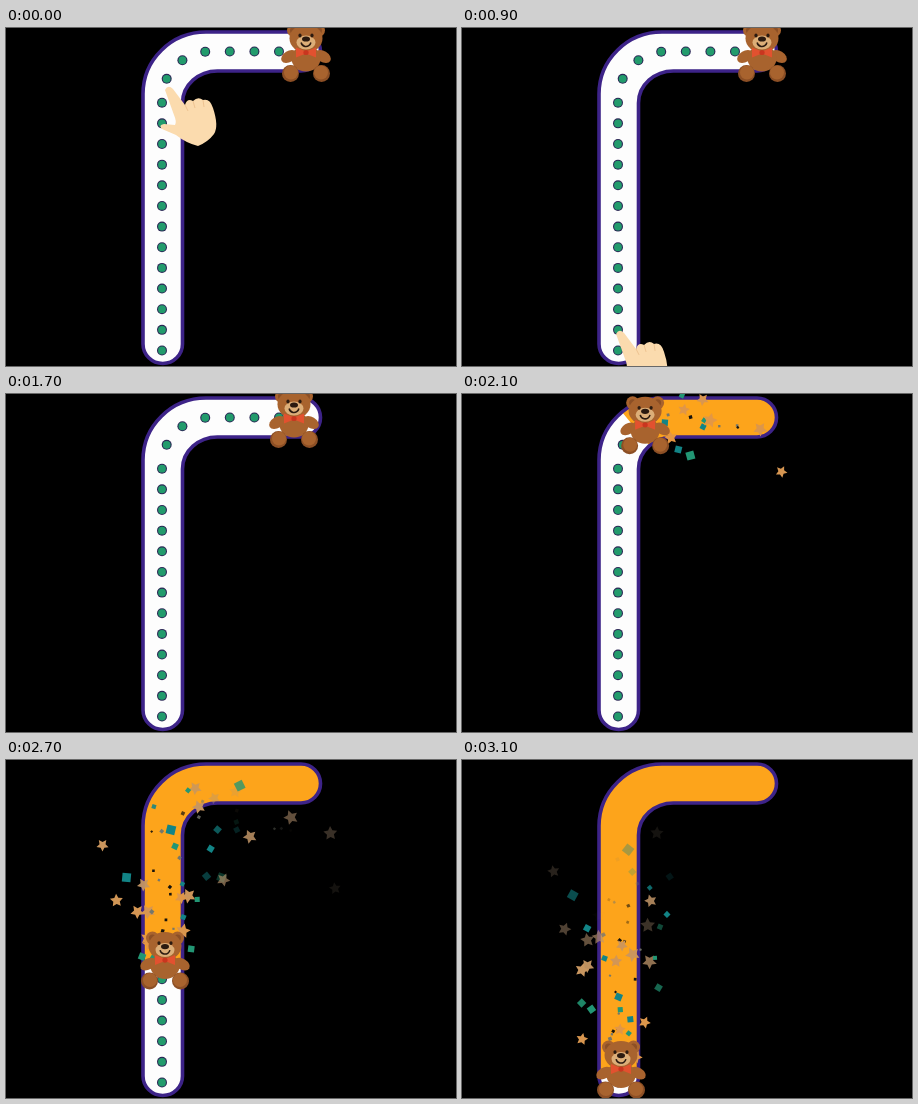
Recreate the animation shown at these times as an HTML page with a canvas. Size 450x338 px, loop 3200 ms.

```html
<!DOCTYPE html>
<html lang="en">
<head>
<meta charset="utf-8">
<title>Trace the path</title>
<style>
  html, body { margin: 0; width: 100%; height: 100%; overflow: hidden; background: #000; }
  canvas { display: block; }
</style>
</head>
<body>
<canvas id="stage" width="450" height="338"></canvas>
<script>
const ctx = document.getElementById('stage').getContext('2d');
const LOOP = 3200, STEP = 100;
const HAND_GONE = 1100, BEAR_READY = 1200, BEAR_GO = 1800;
const PIECES = 90, EMIT_TIME = 1350, LIFE = 950;

// Centre line: along the top, round the bend, then down
const TRACK = { right: 315, top: 23.5, left: 156, bend: 48 };

const track = new Path2D('M200 4H295A19.5 19.5 0 0 1 295 43H212A35 32 0 0 0 176.5 75V316A19.75 19.5 0 0 1 137 316V66A63 62 0 0 1 200 4Z');
const middle = new Path2D('M315 23.5H204A48 48 0 0 0 156 71.5V338');
const handShape = new Path2D('M-3 2Q0-4 5 1L17 17Q19 10 25 13Q30 8 35 12Q42 10 45 20Q51 38 46 46Q40 54 30 58Q18 55 8 47L-6 41Q-10 37-4 36L7 37Q9 34 6 27Z');

function pointAt(s) {
  const { right, top, left, bend } = TRACK;
  const straight = right - left - bend, arc = bend * Math.PI / 2;
  if (s < straight) return [right - s, top];
  if (s < straight + arc) {
    const a = (s - straight) / bend;
    return [left + bend * (1 - Math.sin(a)), top + bend * (1 - Math.cos(a))];
  }
  return [left, top + bend + s - straight - arc];
}

function bearDistance(t) {
  if (t < BEAR_READY) return 18;
  const keys = [[BEAR_GO, 30], [2400, 242], [2700, 314], [3100, 423]];
  const next = keys.findIndex(([time]) => time >= t);
  if (next < 1) return keys[next ? keys.length - 1 : 0][1];
  const [t0, s0] = keys[next - 1], [t1, s1] = keys[next];
  return s0 + (s1 - s0) * (t - t0) / (t1 - t0);
}

function random(seed) {
  const v = Math.sin(seed * 127.1 + 3.7) * 43758.5453;
  return v - Math.floor(v);
}

function oval(x, y, rx, ry, color, turn = 0) {
  ctx.fillStyle = color;
  ctx.beginPath();
  ctx.ellipse(x, y, rx, ry, turn, 0, Math.PI * 2);
  ctx.fill();
}

function square(size, color) {
  ctx.fillStyle = color;
  ctx.fillRect(-size / 2, -size / 2, size, size);
}

function star(r, color) {
  ctx.fillStyle = color;
  ctx.beginPath();
  for (let i = 0; i < 10; i++) {
    const a = i * Math.PI / 5 - Math.PI / 2, d = i % 2 ? r * 0.5 : r;
    ctx.lineTo(d * Math.cos(a), d * Math.sin(a));
  }
  ctx.fill();
}

function at(x, y, turn, paint) {
  ctx.save();
  ctx.translate(x, y);
  ctx.rotate(turn);
  paint();
  ctx.restore();
}

function drawTrack(fillLength) {
  ctx.fillStyle = '#fdfdfd';
  ctx.fill(track);
  for (let i = 0, s = 42; i < 19; i++) {
    const [x, y] = pointAt(s);
    oval(x, y, 5, 5, '#2b2856');
    oval(x, y, 3.9, 3.9, '#229b6c');
    s += i < 6 ? 24.6 : 20.65;
  }
  if (fillLength) {
    ctx.save();
    ctx.clip(track);
    ctx.setLineDash([fillLength, 1000]);
    ctx.lineWidth = 64;
    ctx.strokeStyle = '#fda41b';
    ctx.stroke(middle);
    ctx.restore();
  }
  ctx.lineWidth = 3.6;
  ctx.strokeStyle = '#3d2388';
  ctx.stroke(track);
}

// Pieces burst out of the moving bear, slow down, sink and fade
function drawConfetti(t) {
  for (let i = 0; i < PIECES; i++) {
    const born = BEAR_GO + i / PIECES * EMIT_TIME, age = (t - born) / LIFE;
    if (age <= 0 || age >= 1) continue;
    const [bx, by] = pointAt(bearDistance(born));
    const kind = i % 3, angle = random(i) * Math.PI * 2;
    const reach = (kind === 2 ? 28 : 72) * Math.sqrt(random(i + 100));
    const spread = reach * (1 - (1 - age) ** 4);
    const x = bx + spread * Math.cos(angle);
    const y = by + spread * Math.sin(angle) + 30 * age + 25 * age * age;
    const size = random(i + 200);

    ctx.globalAlpha = Math.min(1, (1 - age) * 2.2);
    at(x, y, random(i + 300) - 0.5 + age, () => {
      if (kind === 0) star(6 + size * 1.8, `hsl(31 ${82 - age * 65}% 58%)`);
      else if (kind === 1) square(4 + size * 5, i % 2 ? '#229674' : '#128486');
      else square(2 + size * 2, i % 2 ? '#17130d' : '#75776c');
    });
  }
  ctx.globalAlpha = 1;
}

function drawBear() {
  const fur = '#a8632e', dark = '#8c4f25', light = '#dcae78', ink = '#2b1a10';
  for (const side of [-1, 1]) {
    oval(side * 12.5, -22, 6.5, 6.5, fur);
    oval(side * 12.5, -22, 3.5, 3.5, dark);
    oval(side * 17, 4, 8.5, 5.5, fur, side * 0.55);
  }
  oval(0, 6, 14.5, 13, fur);
  for (const side of [-1, 1]) {
    oval(side * 15.5, 21, 8.5, 8.5, dark);
    oval(side * 15, 20, 7, 7, fur);
    oval(side * 6, -17, 1.6, 1.9, ink);
  }
  oval(0, -14, 16.5, 14, fur);
  oval(0, -10, 9.5, 7, light);
  for (const side of [-1, 1]) oval(side * 6, -17, 1.6, 1.9, ink);
  oval(0, -13.5, 4, 2.6, ink);
  ctx.strokeStyle = ink;
  ctx.lineWidth = 1.5;
  ctx.beginPath();
  ctx.arc(0, -11, 5, 0.2, Math.PI - 0.2);
  ctx.stroke();
  ctx.fillStyle = '#e2512f';
  ctx.fill(new Path2D('M0-1L-10-5V5L0 1L10 5V-5Z'));
  oval(0, 0, 2.6, 2.6, '#c9361f');
}

function drawHand() {
  ctx.fillStyle = '#fbdbae';
  ctx.fill(handShape);
  ctx.strokeStyle = '#eec391';
  ctx.lineWidth = 1;
  ctx.stroke(new Path2D('M17 17L20 23M25 13L27 20M35 12L36 19'));
}

function draw(t) {
  ctx.fillStyle = '#000';
  ctx.fillRect(0, 0, 450, 338);
  const s = bearDistance(t), [x, y] = pointAt(s);
  drawTrack(t > BEAR_GO ? s + 8 : 0);
  drawConfetti(t);
  at(x + 3, y + 1, 0, drawBear);
  if (t < HAND_GONE) at(162 - t * 0.0055, 60 + t * 0.271, 0, drawHand);
}

function tick() {
  const t = performance.now() % LOOP;
  draw(Math.floor(t / STEP) * STEP);
  requestAnimationFrame(tick);
}
tick();
</script>
</body>
</html>
```
